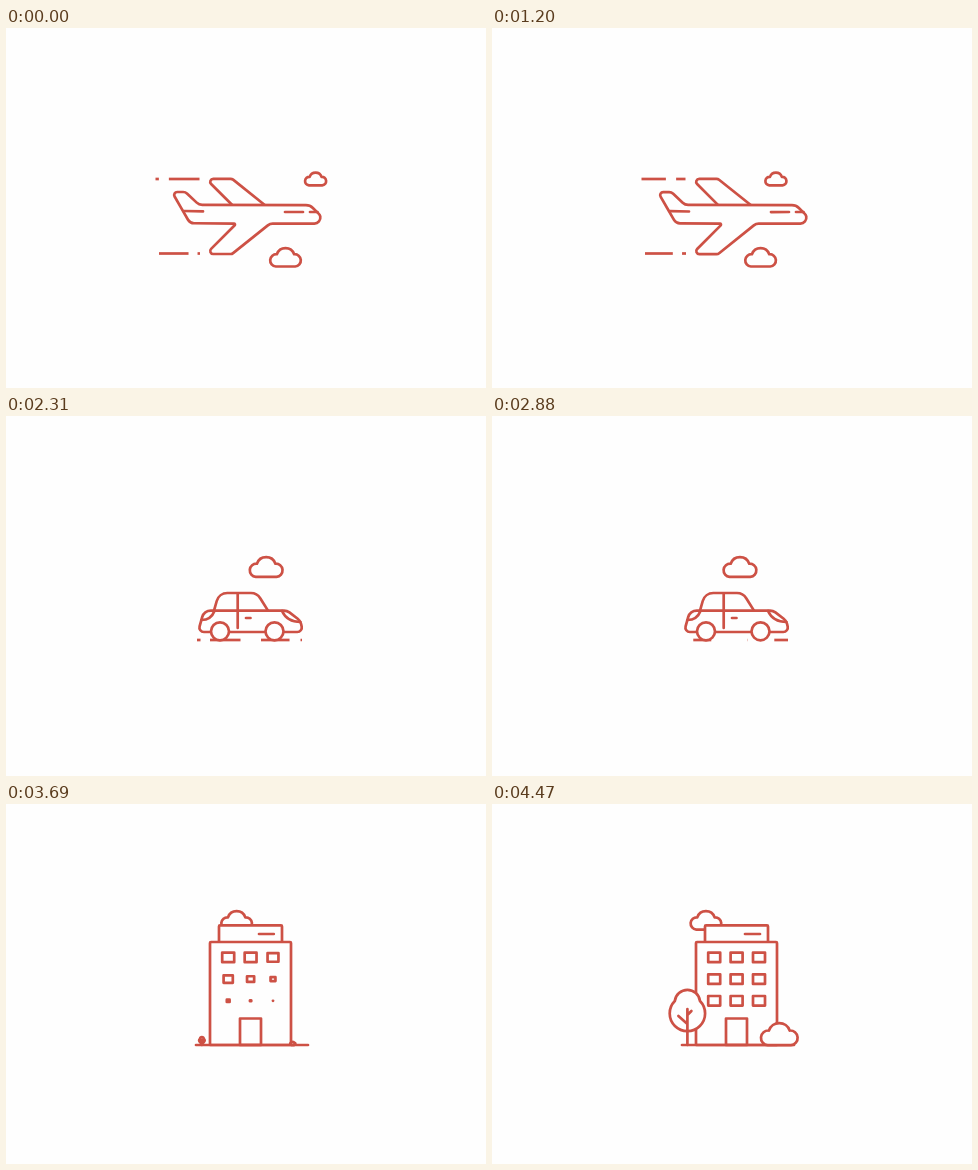
These frames come from a looping animation (480 px wide and 360 px high, 4500 ms). An HTML page with a canvas:

```html
<!DOCTYPE html>
<html lang="en">
<head>
<meta charset="utf-8">
<title>Travel icons</title>
<style>
html, body { margin: 0; width: 100%; height: 100%; overflow: hidden; background: #fefefe; }
canvas { display: block; width: 480px; height: 360px; }
</style>
</head>
<body>
<canvas id="stage" width="480" height="360"></canvas>
<script>
const LOOP = 4500, INK = '#cd5145', PAPER = '#fefefe';
const CUES = [1440, 1660, 3180, 3375], MORPH = 175;
const ctx = document.getElementById('stage').getContext('2d');

const mix = (a, b, k) => Array.isArray(a) ? a.map((v, i) => mix(v, b[i], k)) : a + (b - a) * k;
const ramp = (t, a, b) => Math.min(1, Math.max(0, (t - a) / (b - a)));
const smooth = k => k * k * (3 - 2 * k);
const back = k => 1 + 2.2 * (k - 1) ** 3 + 1.2 * (k - 1) ** 2;

const cue = (i, t, ease = smooth) => ease(ramp(t, CUES[i], CUES[i] + MORPH));

// Blend through plane, hat, car, slab and house; car and house overshoot.
const morph = (states, t) =>
  states.reduce((now, next, i) => mix(now, next, cue(i - 1, t, i % 2 ? smooth : back)));

// Swept wing: both edges lean back in proportion to its height.
function wing(root, tip) {
  const h = Math.abs(root - tip);
  return [[200 + h, root, 1], [200, tip, 3], [226, tip, 4], [226 + 1.25 * h, root, 8]];
}

const row = (from, to, y, n, r) =>
  Array.from({ length: n }, (_, i) => [mix(from, to, i / (n - 1)), y, r]);

// Trapezoid with as many points as the plane, so the outlines can blend.
const hull = (left, right, top, bottom, rear, front, r) => [
  ...row(left + rear, right - front, top, 4, r),
  [right - front * .17, mix(top, bottom, .47), r],
  ...row(right, left, bottom, 6, r / 2)
];

const cap = (left, right, top, base, rear, front, r) =>
  [[left, base, 0], [left + rear, top, r], [right - front, top, r], [right, base, 0]];

const PLANE = [
  [166, 164, 3], [179.5, 164, 6], [193, 176.8, 8], [304, 177.2, 10], [314, 187, 5],
  [315.5, 195.6, 6], ...wing(195.6, 226).reverse(), [184, 195.2, 7]
];

const BODY = [
  PLANE,
  hull(196, 287, 180, 199, 8, 9, 5),
  hull(192, 297, 194.6, 216, 6, 16, 9),
  hull(215.5, 273.5, 218.5, 240, 0, 0, 1),
  hull(204, 285, 138, 241, 0, 0, 1)
];
const TOP = [
  wing(177, 150.8),
  cap(221, 262, 162, 180, 8, 11, 6),
  cap(208, 262, 177, 194.6, 5, 11, 11),
  cap(216, 273, 218.5, 218.5, 0, 0, 0),
  cap(213, 276, 121.4, 138, 0, 0, 1)
];
const SKY_SIZE = [.7, 1.49, 1.09, .66, 1.02];

function poly(pts, closed) {
  const first = pts[0], last = pts[pts.length - 1];
  ctx.beginPath();
  ctx.moveTo(...(closed ? mix(first, last, .5) : first).slice(0, 2));
  pts.forEach(([x, y, r], i) => {
    const next = pts[i + 1] || first;
    if (closed || (i && i < pts.length - 1)) ctx.arcTo(x, y, next[0], next[1], Math.max(0, r));
  });
  if (closed) ctx.closePath();
  else ctx.lineTo(last[0], last[1]);
  ctx.fill();
  ctx.stroke();
}

function line(x1, y1, x2, y2, k = 1) {
  if (k <= 0) return;
  ctx.beginPath();
  ctx.moveTo(x1, y1);
  ctx.lineTo(mix(x1, x2, k), mix(y1, y2, k));
  ctx.stroke();
}

function shape(d, x = 0, y = 0, s = 1, fill = true) {
  if (s <= .02) return;
  const p = new Path2D();
  p.addPath(new Path2D(d), new DOMMatrix([s, 0, 0, s, x, y]));
  if (fill) ctx.fill(p);
  ctx.stroke(p);
}

const cloud = (x, y, s) =>
  shape('M-9.5 9A6 6 0 0 1-8.5-3A9 9 0 0 1 8.5-3A6 6 0 0 1 9.5 9Z', x, y, s);

// Box centred on x and standing on y.
function box(x, y, w, h) {
  if (h > 0) ctx.strokeRect(x - w / 2, y - h, w, h);
}

// A piece of a line that wraps around at both ends.
function trail(x, y, span, mid, len) {
  ctx.lineCap = 'butt';
  const c = (mid - Math.floor(mid)) * span;
  for (const shift of [-span, 0, span]) {
    const a = Math.max(0, c + shift - len / 2), b = Math.min(span, c + shift + len / 2);
    if (b > a) line(x + a, y, x + b, y);
  }
  ctx.lineCap = 'round';
}

function streaks(t, fly, drive) {
  const turn = t / 2310, len = 26 + 8 * Math.cos(4 * Math.PI * turn);
  const upper = .69 - turn, lower = .33 - 2 * turn;
  trail(149.5, 151, 44, upper, len * fly);
  trail(153, 225.5, 41, lower, (len - 2) * fly);
  trail(191, 224, 43.5, upper, len * drive);
  trail(255, 224, 41, lower, (len - 4) * drive);
}

function plane(t, show) {
  line(178, 183, 197, 183.4, show);
  line(279, 184, 297, 184, show);
  line(304, 184, 311.5, 184, show);
}

function car(t, show, out) {
  const drop = cue(1, t, back);
  if (t > 1600 && out > 0) {
    const x = mix(231.5, 240, drop), y = mix(187, 202, drop);
    line(x, y, x + mix(1.5, 4.5, drop), y, out);
  }
  if (show <= 0) return;
  line(231.7, 177.5, 231.7, 212, show);
  ctx.globalAlpha = show;
  shape('M195.5 204Q205 204 208.5 195M276 195Q281 206 294.5 206', 0, 0, 1, false);
  ctx.globalAlpha = 1;
  for (const x of [214, 268.5]) shape('M-9 0A9 9 0 1 1 9 0A9 9 0 1 1-9 0Z', x, 215.3, show);
}

function house(t) {
  const since = t - CUES[3];
  if (since <= 0) return;
  const grow = (delay, time, ease = smooth) => ease(ramp(since, delay, delay + time));

  for (let i = 0; i < 9; i++) {
    const k = grow(145 + 20 * i, 160), col = i % 3, line = (i - col) / 3;
    box(222.2 + 22.4 * col, 153.4 + 21.7 * line + 4.8 * k, 12 * k, 9.6 * k);
  }
  box(244.5, 241, 21, 26.5 * grow(105, 180));
  line(253, 130, 268, 130, grow(185, 140));
  const ground = grow(45, 240);
  line(245 - 55 * ground, 241, 245 + 57 * ground, 241);

  const size = grow(305, 280, back), drift = .5 * grow(645, 450), x = 195.9 - drift;
  if (size <= 0) return;
  shape('M-12.6-44A12.7 12.7 0 0 1 12.6-44A17.7 17.7 0 1 1-12.6-44Z', x, 241, size);
  shape('M0 0V-36M0-21L-9-29M0-30L4-34', x, 241, size, false);
  cloud(286.8 + drift, 241 - 10.8 * size, 1.22 * size);
}

function draw(t) {
  ctx.fillStyle = PAPER;
  ctx.fillRect(0, 0, 480, 360);
  ctx.strokeStyle = INK;
  ctx.lineWidth = 2.7;
  ctx.lineCap = ctx.lineJoin = 'round';

  const fly = 1 - cue(0, t), out = 1 - cue(2, t), drive = cue(1, t) * out;
  cloud(309.6 - .0214 * t, 151 - 34.6 * cue(3, t), morph(SKY_SIZE, t));
  cloud(279.5 - .0091 * t, 229.3, 1.02 * fly);
  streaks(t, fly, drive);

  // The plane rocks gently about its nose.
  const tilt = .37 * fly * (Math.cos(2 * Math.PI * t / 1320) - 1);
  ctx.save();
  ctx.translate(314, 190);
  ctx.rotate(tilt * Math.PI / 180);
  ctx.translate(-314, -190);
  poly(morph(TOP, t));
  poly(morph(BODY, t), true);
  plane(t, fly);
  ctx.restore();

  car(t, drive, out);
  house(t);
}

const start = performance.now();
function tick() {
  const t = (performance.now() - start) % LOOP;
  draw(Math.floor(t / 30) * 30);
  requestAnimationFrame(tick);
}
tick();
</script>
</body>
</html>
```
